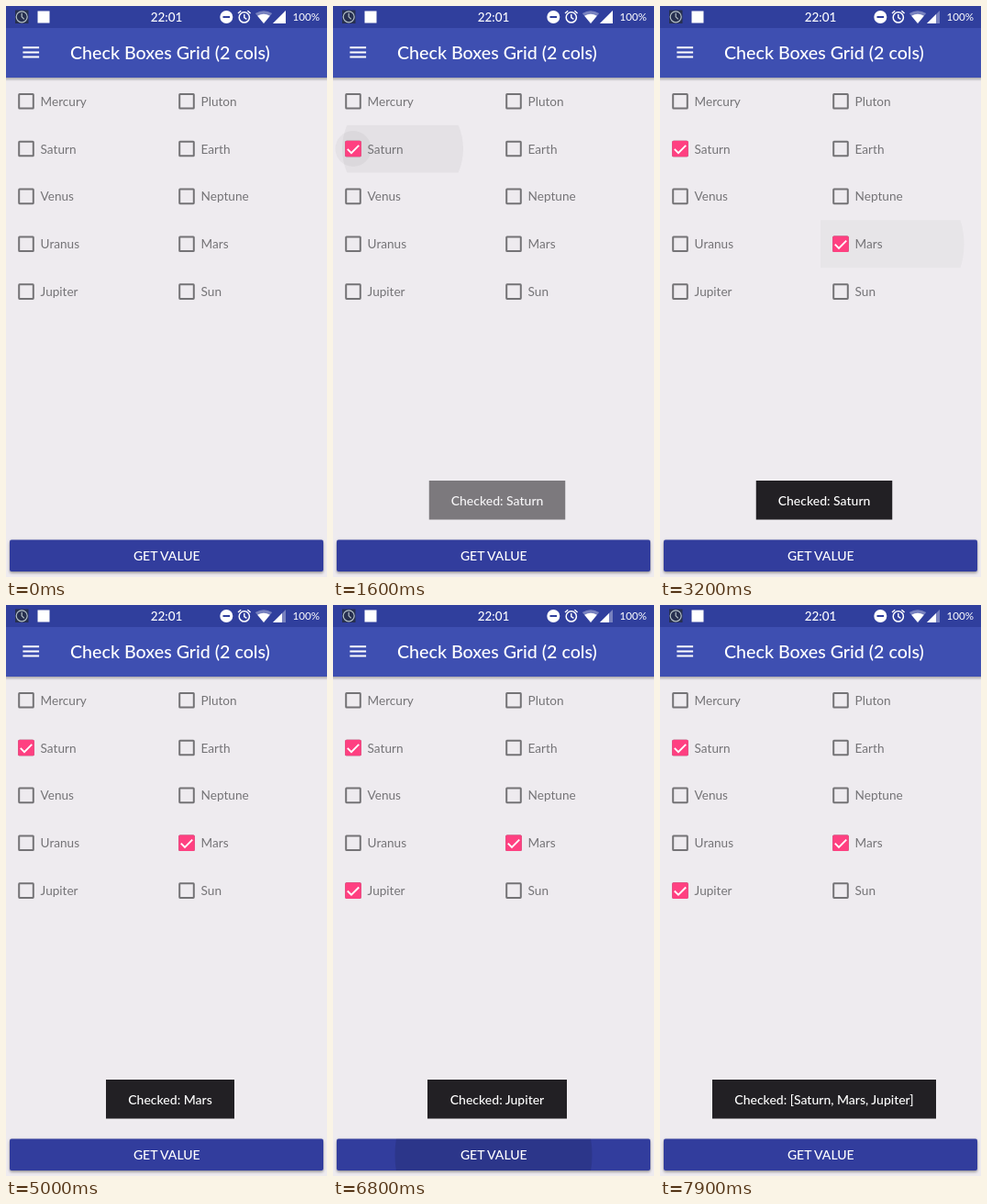
An HTML page for the animation above (8 s loop, 350 by 622 pixels).

```html
<!DOCTYPE html>
<html lang="en">
<head>
<meta charset="utf-8">
<title>Check Boxes Grid</title>
<style>
  html, body { margin: 0; width: 100%; height: 100%; overflow: hidden; background: #eeebef; }
  svg { display: block; width: 350px; height: 622px; font-family: Lato, Carlito, sans-serif; }
  .label { font-size: 13.6px; fill: #757477; }
  .bold { font-weight: 500; fill: #fff; }
  .mid { text-anchor: middle; }
  .line { fill: none; stroke: #fff; }
</style>
</head>
<body>
<svg id="stage" viewBox="0 0 350 622">
  <defs>
    <linearGradient id="shade" x2="0" y2="1">
      <stop offset="0" stop-color="#000" stop-opacity=".28"/>
      <stop offset="1" stop-color="#000" stop-opacity="0"/>
    </linearGradient>
    <filter id="drop" x="-5%" y="-20%" width="110%" height="150%">
      <feDropShadow dx="0" dy="1.5" stdDeviation="1.4" flood-color="#000" flood-opacity=".4"/>
    </filter>
    <clipPath id="buttonClip"><rect x="4" y="581.5" width="342" height="34.5" rx="2"/></clipPath>
  </defs>
  <rect width="350" height="622" fill="#eeebef"/>

  <!-- app bar -->
  <rect y="78" width="350" height="4" fill="url(#shade)"/>
  <rect y="24" width="350" height="54" fill="#3e4fb1"/>
  <path class="line" stroke-width="2" d="M18.4 45.3h17.7M18.4 50.4h17.7M18.4 55.5h17.7"/>
  <text class="bold" x="70" y="58" font-size="19.65">Check Boxes Grid (2 cols)</text>

  <!-- status bar -->
  <rect width="350" height="24" fill="#303f9d"/>
  <rect x="10" y="4.5" width="14.5" height="14.5" fill="#27304f"/>
  <circle class="line" cx="17.2" cy="11.8" r="6" stroke-width="1.2" style="stroke:#b4c0c8"/>
  <path class="line" stroke-width="1.2" style="stroke:#b4c0c8" d="M17.2 7.8v4l2.6 2.6"/>
  <rect x="34.5" y="5.5" width="13" height="13" fill="#fff"/>
  <text class="bold mid" x="175" y="17" font-size="13.5">22:01</text>
  <circle cx="240.3" cy="12" r="7" fill="#fff"/>
  <path d="M236.5 12h7.6" stroke="#303f9d" stroke-width="2"/>
  <circle class="line" cx="259.8" cy="12.4" r="5.6" stroke-width="1.5"/>
  <path class="line" stroke-width="1.4" d="M259.8 9v3.7l2.6 1.7M253 8l3.2-2.8M266.6 8l-3.2-2.8"/>
  <path d="M281 19L271.8 8Q281 2.400 290.200 8Z" fill="#fff" opacity=".35"/>
  <path d="M281 19L274.200 10.800Q281 6.600 287.800 10.800Z" fill="#fff"/>
  <path d="M291 19L305 5V19Z" fill="#fff" opacity=".35"/>
  <path id="signal" fill="#fff"/>
  <text class="bold" x="342" y="16.400" font-size="11.6" text-anchor="end" style="font-weight:400">100%</text>

  <g id="grid"></g>

  <!-- button -->
  <rect x="4" y="581.5" width="342" height="34.5" rx="2" fill="#303c9d" filter="url(#drop)"/>
  <g clip-path="url(#buttonClip)"><circle id="press" cx="175" cy="599"/></g>
  <text class="bold mid" x="175.300" y="604" font-size="14">GET VALUE</text>

  <g id="toasts"></g>
</svg>
<script>
const LOOP = 8000, TICK = 100;
const $ = id => document.getElementById(id);
const clamp = x => Math.min(1, Math.max(0, x));
const ramp = (t, from, to) => clamp((t - from) / (to - from));
const ease = x => (1 - Math.cos(Math.PI * x)) / 2;

function add(parent, tag, attrs, text) {
  const el = document.createElementNS('http://www.w3.org/2000/svg', tag);
  for (const k in attrs) el.setAttribute(k, attrs[k]);
  if (text) el.textContent = text;
  return parent.appendChild(el);
}
function set(el, attrs) {
  for (const k in attrs) el.setAttribute(k, attrs[k]);
}

const names = ['Mercury', 'Pluton', 'Saturn', 'Earth', 'Venus', 'Neptune', 'Uranus', 'Mars', 'Jupiter', 'Sun'];
const taps = {
  Saturn: { at: 1350, x: 76 },
  Mars: { at: 2850, x: 244 },
  Jupiter: { at: 5000, x: 76 }
};
const BUTTON_AT = 6550;

const cells = [];
names.forEach((name, i) => {
  const left = i % 2 * 175, x = left + 22, y = 103.7 + Math.floor(i / 2) * 51.85;
  const tap = taps[name], cell = { tap };
  const g = add($('grid'), 'g');
  if (tap) {
    const clip = add(g, 'clipPath', { id: 'clip' + name });
    add(clip, 'rect', { x: left, y: y - 25.9, width: 175, height: 51.8 });
    const wave = add(g, 'g', { 'clip-path': `url(#clip${name})` });
    cell.wave = add(wave, 'circle', { cx: tap.x, cy: y });
    cell.halo = add(g, 'circle', { cx: x, cy: y, r: 19.5 });
  }
  add(g, 'rect', { x: x - 7.8, y: y - 7.8, width: 15.6, height: 15.6, rx: .6, fill: 'none', stroke: '#747376', 'stroke-width': 2 });
  add(g, 'text', { class: 'label', x: left + 37.6, y: y + 5 }, name);
  if (tap) {
    cell.fill = add(g, 'rect', { x: x - 8.8, y: y - 8.8, width: 17.6, height: 17.6, rx: 1.6, fill: '#ff4081' });
    cell.mark = add(g, 'path', {
      class: 'line', d: `M${x - 6.2} ${y + .4}l4.2 4.2l8.2 -8.2`,
      'stroke-width': 1.9, pathLength: 1, 'stroke-dasharray': '1 2'
    });
    cells.push(cell);
  }
});

const toasts = [
  { at: 1385, width: 148.5, text: 'Checked: Saturn' },
  { at: 3495, width: 140, text: 'Checked: Mars' },
  { at: 5495, width: 152, text: 'Checked: Jupiter' },
  { at: 7370, width: 244, text: 'Checked: [Saturn, Mars, Jupiter]' }
];
for (const toast of toasts) {
  toast.el = add($('toasts'), 'g');
  add(toast.el, 'rect', { x: 179 - toast.width / 2, y: 517, width: toast.width, height: 42.5, fill: '#222024' });
  add(toast.el, 'text', { class: 'bold mid', x: 179, y: 544.2, 'font-size': 14 }, toast.text);
}

function drawCell({ tap, wave, halo, fill, mark }, t) {
  const age = t - tap.at;
  const rise = ramp(age, 0, 100);
  set(wave, { r: Math.max(0, 12 + .216 * age), opacity: .045 * rise * (1 - ramp(age, 250, 500)) });
  set(halo, { opacity: .04 * rise * (1 - ramp(age, 250, 340)) });
  fill.setAttribute('opacity', ramp(age, 0, 120));
  const drawn = ramp(age, 60, 220);
  set(mark, { 'stroke-dashoffset': 1 - drawn, opacity: drawn ? 1 : 0 });
}

function draw(t) {
  for (const cell of cells) drawCell(cell, t);
  toasts.forEach((toast, i) => {
    const next = toasts[i + 1];
    const shown = ease(ramp(t, toast.at, toast.at + 400));
    const gone = next ? ease(ramp(t, next.at + 100, next.at + 500)) : 0;
    toast.el.setAttribute('opacity', shown * (1 - gone));
  });
  const age = t - BUTTON_AT;
  set($('press'), {
    r: Math.max(0, 20 + .35 * age),
    opacity: .12 * ramp(age, 0, 100) * (1 - ramp(age, 300, 800))
  });
  $('signal').setAttribute('d', t < 2300 ? 'M291 19L305 5V19Z' : 'M291 19L301 9V19Z');
}

const start = performance.now();
function frame() {
  const t = (performance.now() - start) % LOOP;
  draw(Math.floor(t / TICK) * TICK);
  requestAnimationFrame(frame);
}
frame();
</script>
</body>
</html>
```
